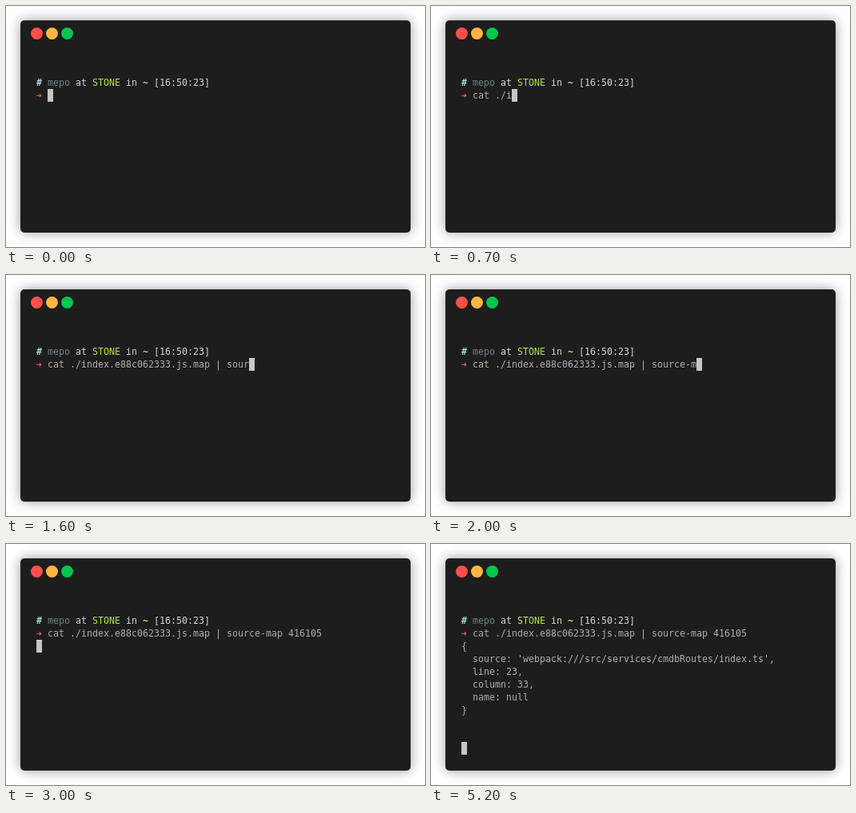
Animation, 524 px wide and 302 px high, one loop 5300 ms. Source, as an HTML page:

```html
<!DOCTYPE html>
<html lang="en">
<head>
<meta charset="utf-8">
<title>Terminal</title>
<style>
  html, body { margin: 0; width: 100%; height: 100%; overflow: hidden; background: #fff; }
  .window {
    position: absolute; left: 18px; top: 18px; width: 488px; height: 266px;
    border-radius: 5px; background: #1d1d1d; box-shadow: 0 0 15px rgba(0, 0, 0, .4);
  }
  .dot { position: absolute; top: 9px; width: 15px; height: 15px; border-radius: 50%; }
  .screen {
    position: absolute; left: 20px; top: 70px; color: #afafaf;
    font: 11.63px/16px "DejaVu Sans Mono", monospace; font-variant-ligatures: none;
  }
  .row { position: absolute; left: 0; height: 16px; white-space: pre; }
  .bright { color: #d5d5d0; }
  .hash { color: #a6dcd6; font-weight: bold; }
  .user { color: #708387; }
  .host { color: #b3e33b; }
  .path { color: #ebc566; font-weight: bold; }
  .arrow { color: #f0625c; }
  .cursor { position: absolute; width: 7px; height: 16px; background: #c7c7c7; }
</style>
</head>
<body>
<div class="window">
  <div class="dot" style="left:13px;background:#ff4f4d"></div>
  <div class="dot" style="left:32px;background:#ffb742"></div>
  <div class="dot" style="left:51px;background:#00c64e"></div>
  <div class="screen">
    <div class="row bright"><span class="hash">#</span> <span class="user">mepo</span> at <span class="host">STONE</span> in <span class="path">~</span> [16:50:23]</div>
    <div class="row arrow" style="top:16px">➜</div>
    <div class="row" id="command" style="top:16px;left:14px"></div>
    <div class="row" id="output" style="top:32px">{
  source: 'webpack:///src/services/cmdbRoutes/index.ts',
  line: 23,
  column: 33,
  name: null
}</div>
    <div class="cursor" id="cursor"></div>
  </div>
</div>
<script>
  const LOOP = 5300, STEP = 100, CELL = 7, LINE = 16;
  const TEXT = 'cat ./index.e88c062333.js.map | source-map 416105';
  const COMPLETED = 30; // length after tab completion
  const [command, output, cursor] =
    ['command', 'output', 'cursor'].map(id => document.getElementById(id));

  function typedCount(step) {
    if (step < 9) return step;
    return Math.min(TEXT.length, COMPLETED + Math.max(0, step - 10));
  }

  function cursorCell(step, typed) {
    if (step < 30) return [2 + typed, 1];
    if (step < 31) return [0, 2];
    if (step < 32) return [0, 8];
    return [0, step < 52 ? 9 : 10];
  }

  let last = -1;
  function draw() {
    const step = Math.floor(performance.now() % LOOP / STEP);
    if (step !== last) {
      last = step;
      const typed = typedCount(step);
      const [col, row] = cursorCell(step, typed);
      command.textContent = TEXT.slice(0, typed);
      output.style.visibility = step >= 31 ? 'visible' : 'hidden';
      cursor.style.left = col * CELL + 'px';
      cursor.style.top = row * LINE + 'px';
    }
    requestAnimationFrame(draw);
  }
  draw();
</script>
</body>
</html>
```
